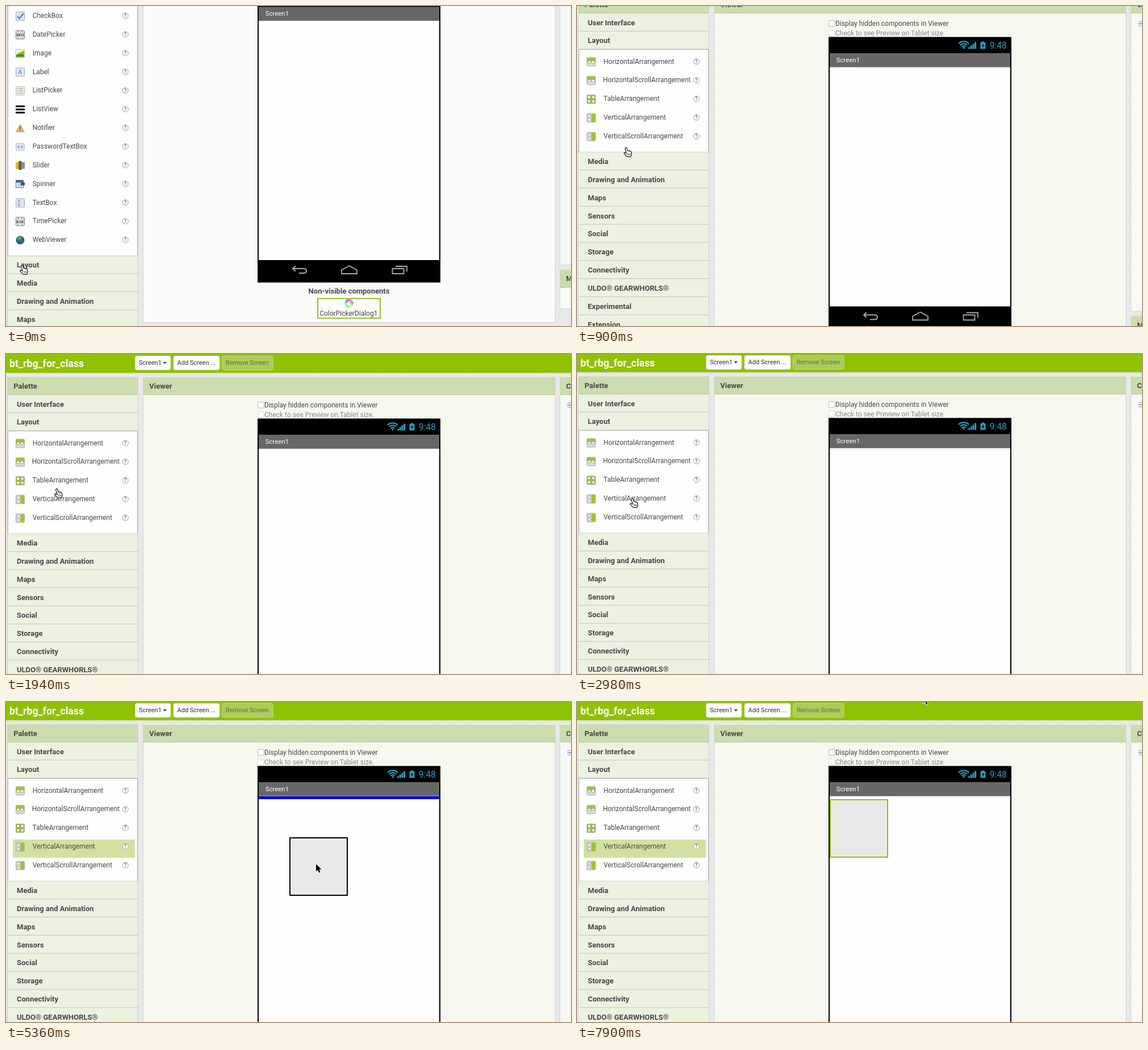
These frames come from a looping animation (995 by 563 pixels, 8000 ms). An HTML page:

```html
<!DOCTYPE html>
<html lang="en">
<head>
<meta charset="utf-8">
<title>Block designer</title>
<style>
html, body { margin: 0; width: 100%; height: 100%; overflow: hidden; background: #e8e8e8; }
svg { display: block; }
text { font: 12px Roboto, sans-serif; fill: #484848; white-space: pre; }
.b { font-weight: 700; font-size: 13px; }
.btn { font-size: 11px; }
.off { fill: #8b8b8b; }
.anim { animation: 8s step-end infinite; }
#page { animation-name: scroll; }
#viewer { animation-name: tint; }
#hand { animation-name: hand; }
#arrow { animation-name: arrow; }
#ghost { animation-name: ghost; }
#first { animation-name: first; }
#second { animation-name: second; }
#mark { animation-name: drag; }
#slot { animation-name: slot; }
#placed { animation-name: placed; }

@keyframes scroll {
  0% { transform: translateY(-139.5px); }
  7.5% { transform: translateY(-125px); }
  9.375% { transform: translateY(-91px); }
  11.25% { transform: translateY(-58px); }
  13% { transform: translateY(-37px); }
  14.875% { transform: translateY(-21px); }
  18.625% { transform: translateY(-10px); }
  20.5% { transform: translateY(-3px); }
  24.25% { transform: translateY(1px); }
  28%, 100% { transform: translateY(0); }
}
@keyframes tint { 0% { fill: #fafaf8; } 1.875%, 100% { fill: #f6f8f0; } }
@keyframes first { 0% { visibility: visible; } 1.875%, 100% { visibility: hidden; } }
@keyframes second { 0% { visibility: hidden; } 1.875%, 100% { visibility: visible; } }
@keyframes drag { 0% { visibility: hidden; } 52.25%, 100% { visibility: visible; } }
@keyframes slot {
  0% { visibility: hidden; } 63.375% { visibility: visible; } 74.5%, 100% { visibility: hidden; }
}
@keyframes placed { 0% { visibility: hidden; } 74.5%, 100% { visibility: visible; } }
@keyframes hand {
  0% { transform: translate(24px, 455px); }
  3.75% { transform: translate(29px, 440px); }
  5.625% { transform: translate(44px, 390px); }
  7.5% { transform: translate(65px, 318px); }
  9.375% { transform: translate(79px, 264px); }
  11.25% { transform: translate(82px, 248px); }
  24.25% { transform: translate(85px, 236px); }
  26.125% { transform: translate(88px, 250px); }
  28% { transform: translate(93px, 264px); }
  31.75% { transform: translate(93px, 262px); }
  33.625% { transform: translate(93px, 258px); }
  35.5% { transform: translate(93px, 255px); }
  37.25% { transform: translate(93px, 253px); visibility: visible; }
  52.25%, 100% { transform: translate(93px, 253px); visibility: hidden; }
}
@keyframes ghost {
  0% { transform: translate(52px, 209px); visibility: hidden; }
  52.25% { transform: translate(52px, 209px); visibility: visible; }
  54.125% { transform: translate(75px, 206px); }
  56% { transform: translate(125px, 203px); }
  57.875% { transform: translate(195px, 203px); }
  59.625% { transform: translate(275px, 208px); }
  61.5% { transform: translate(350px, 217px); }
  63.375% { transform: translate(425px, 228px); }
  65.125% { transform: translate(480px, 235px); }
  67% { transform: translate(499px, 238px); visibility: visible; }
  74.5%, 100% { transform: translate(499px, 238px); visibility: hidden; }
}
@keyframes arrow {
  0% { transform: translate(99px, 256px); visibility: hidden; }
  52.25% { transform: translate(99px, 256px); visibility: visible; }
  54.125% { transform: translate(122px, 253px); }
  56% { transform: translate(172px, 250px); }
  57.875% { transform: translate(242px, 250px); }
  59.625% { transform: translate(322px, 255px); }
  61.5% { transform: translate(397px, 264px); }
  63.375% { transform: translate(472px, 275px); }
  65.125% { transform: translate(527px, 282px); }
  67% { transform: translate(546px, 285px); }
  85.75% { transform: translate(548px, 277px); }
  87.625% { transform: translate(555px, 248px); }
  89.5% { transform: translate(567px, 198px); }
  91.375% { transform: translate(581px, 138px); }
  93.125% { transform: translate(593px, 82px); }
  95% { transform: translate(602px, 36px); }
  96.875% { transform: translate(608px, 5px); }
  98.75%, 100% { transform: translate(610px, -11px); visibility: visible; }
}
</style>
</head>
<body>
<svg id="stage" width="995" height="563" viewBox="0 0 995 563"></svg>
<script>
const rect = (x, y, w, h, fill, more = '') =>
  `<rect x="${x}" y="${y}" width="${w}" height="${h}" fill="${fill}" ${more}/>`;
const path = (d, fill, more = '') => `<path d="${d}" fill="${fill}" ${more}/>`;
const line = (d, color, w = 1) => path(d, 'none', `stroke="${color}" stroke-width="${w}"`);
const text = (x, y, s, cls = '', more = '') => `<text x="${x}" y="${y}" class="${cls}" ${more}>${s}</text>`;
const at = (x, y, s) => `<g transform="translate(${x} ${y})">${s}</g>`;
const tiny = (x, y, s, size, color) => text(x, y, s, '', `style="font-size:${size}px;fill:${color};font-weight:700"`);

// 16 x 16 component icons
const frame = (fill = '#e9edf3', edge = '#a3aab3') => rect(.5, .5, 15, 15, fill, `rx="1.5" stroke="${edge}"`);
const cells = (...spots) => spots.map(([x, y]) => rect(x, y, 4.5, 4.5, '#fff', 'rx=".8" stroke="#8d9a80" stroke-width=".8"')).join('');
const tile = frame('#d9dbd8', '#a9aca6');
const across = tile + rect(1, 1, 14, 7, '#9cc52f') + cells([2.5, 6], [9, 6]);
const down = tile + rect(8.5, 1, 6.5, 14, '#9cc52f') + cells([2.5, 2.5], [2.5, 9]);
const clock = s => frame('#eee', '#777') + rect(1, 4, 14, 7.5, '#cfcfcf') + tiny(1.5, 10.5, s, 6, '#333') +
  line('M3 2.5H6M10 2.5H13M3 13.5H6M10 13.5H13', '#666');
const icons = {
  Button: frame(),
  CheckBox: frame('#dce6f5') + line('M3 8.5L6.5 12L14 3', '#5b86cf', 2.6),
  DatePicker: clock('2011'),
  Image: rect(0, 1, 16, 14, '#eef2e4', 'rx="1" stroke="#b9c4a8"') + path('M1 10L8 6L15 3V14H1Z', '#8dbb2c') + path('M1 14V11Q8 7 15 11V14Z', '#4f8a1c'),
  Label: frame('#dfe7f4') + tiny(4.3, 12, 'A', 10.5, '#7e9bc8'),
  ListPicker: frame('#eeefe6', '#b7b8ae') + line('M5.5 4H13M5.5 8H13M5.5 12H13', '#aaa', 1.3) + line('M2.5 4H4M2.5 8H4M2.5 12H4', '#9cc52f', 1.5),
  ListView: line('M0 2.5H16M0 8H16M0 13.5H16', '#000', 3),
  Notifier: path('M8 1.5L15.5 14.5H.5Z', '#e9b765', 'stroke="#c99a55" stroke-linejoin="round"') + line('M8 5.5V10M8 11.5V13', '#754c1c', 1.6),
  PasswordTextBox: rect(.5, 2, 15, 12, '#dbe4ee', 'rx="1.5" stroke="#b3bdc8"') + '<circle cx="5" cy="8" r="1.6" fill="#7289a6"/><circle cx="11" cy="8" r="1.6" fill="#7289a6"/>',
  Slider: rect(0, 2, 6, 12, '#e5b91d') + rect(6, 1, 4, 14, '#666', 'stroke="#333"') + rect(11, 2, 5, 12, '#8d8d8d'),
  Spinner: rect(.5, 1, 13, 13, '#f4f4f4', 'stroke="#5c6d83"') + rect(1, 1.5, 12, 4, '#446fae') + line('M3 8H11M3 11H11', '#888') + rect(9, 5, 7, 5, '#3a5275'),
  TextBox: frame('#dde5ed') + line('M4 4H8M6 4V12M4 12H8', '#8b98a8', 1.2),
  TimePicker: clock('8:10'),
  WebViewer: '<circle cx="8" cy="8" r="7.5" fill="#2c5c97"/>' + path('M3 4Q8 0 11 3L9 7L4 9Z', '#68a83f') + path('M9 9L14 8Q13 13 9 14Z', '#3f8038'),
  HorizontalArrangement: across,
  HorizontalScrollArrangement: across,
  TableArrangement: frame('#9cc52f', '#a9aca6') + cells([2, 2], [9.5, 2], [2, 9.5], [9.5, 9.5]),
  VerticalArrangement: down,
  VerticalScrollArrangement: down
};
const names = Object.keys(icons);
const lists = [names.slice(0, 14), names.slice(14)];
const sections = ['User Interface', 'Layout', 'Media', 'Drawing and Animation', 'Maps', 'Sensors', 'Social',
  'Storage', 'Connectivity', 'ULDO® GEARWHORLS®', 'Experimental', 'Extension'];
const ROW = 31.85, ITEM = 32.85;

function item(name, y) {
  const x = name.startsWith('HorizontalScroll') ? 45.7 : 46.7;
  return at(17, y - 7, icons[name]) + text(x, y + 4.2, name) +
    `<circle cx="210.3" cy="${y + .3}" r="5" fill="#fff" stroke="#999"/>` + tiny(207.9, y + 3.4, '?', 8.5, '#777');
}

function palette(open) {
  let y = 87, out = '';
  sections.forEach((name, i) => {
    out += rect(3, y - 16, 229, ROW, '#edf1e0') + rect(3, y + 14.6, 229, 1.6, '#c8ccc6') + text(19, y + 4.6, name, 'b');
    if (i === open) {
      const items = lists[i], h = items.length * ITEM + 16.4;
      out += rect(3.5, y + 15.7, 228, h, '#fefefe', 'stroke="#b4b4b4"');
      if (i === 1) out += rect(12, 242, 215, 32, '#d3e0a3', 'id="mark" class="anim"');
      items.forEach((n, k) => out += item(n, y + 36.5 + k * ITEM));
      y += h;
    }
    y += ROW;
  });
  return rect(2.5, 40, 230, y - 56, '#edf1e0', 'stroke="#cfcfcf"') + out;
}

const head = (x, w, y, s) => rect(x, y, w, 31, '#cbdcae') + rect(x, y + 30, w, 1, '#b5c69b') + text(x + 10.3, y + 19.7, s, 'b');
const button = (x, w, s) => rect(x + .5, 2.5, w, 24.5, '#fdfdfd', 'rx="3" stroke="#d5dfbb"') + text(x + 7, 18, s, 'btn', 'style="fill:#333"');
const check = (y, s, cls, edge) => rect(443.5, y - 5, 10.5, 10.5, '#fff', `rx="1" stroke="${edge}"`) + text(455, y + 4.3, s, cls);

function toolbar() {
  return rect(0, -200, 995, 232, '#8fc202') + rect(0, 32, 995, 1.5, '#d3dcc0') +
    text(6, 22.3, 'bt_rbg_for_class', 'b', 'style="font-size:17.8px;fill:#fff"') +
    button(227, 62.5, 'Screen1') + path('M276.5 13H283L279.7 16.6Z', '#333') + button(294.5, 81, 'Add Screen ...') +
    rect(380.5, 2.5, 89.5, 24.5, '#abcb5d', 'rx="3" stroke="#c3da87"') + text(387, 18, 'Remove Screen', 'btn', 'style="fill:#5b7a23"');
}

function phone() {
  const blue = '#2d9cc3';
  const arc = (r, w) => line(`M${681 - r * .72} ${133 - r * .7}A${r} ${r} 0 0 1 ${681 + r * .72} ${133 - r * .7}`, blue, w);
  let out = rect(443, 112.5, 322, 513.5, '#000') + rect(445, 141, 318, 24.5, '#676767') + rect(445, 165.5, 318, 421, '#fefefe');
  out += arc(12.5, 2.4) + arc(8.6, 2.3) + arc(4.8, 2.2) + path('M681 134L678.8 131Q681 129.4 683.2 131Z', blue);
  [3, 6, 9, 12].forEach((h, i) => out += rect(689 + i * 3.7, 133.5 - h, 3, h, blue));
  out += path('M713 120.5H717V122H719.5V133.5H710.5V122H713Z', blue) + path('M715.8 123.5L712.5 128.2H714.8L714 132L717.6 127H715.3Z', '#000');
  out += text(726.7, 132.8, '9:48', '', `style="font-size:15.7px;fill:${blue}"`);
  out += text(456.8, 156.5, 'Screen1', '', 'style="font-size:11.4px;fill:#fff"');
  const gray = '#a9a9a9';
  out += line('M510 597L505 601.5L510 606M505.5 601.5H524Q529 601.5 529 605.5T524 609.5H516', gray, 2);
  out += line('M591 604L604.5 596.5L618 604V610.5H591Z', gray, 1.8);
  out += line('M680.5 601.5H700.5V610.5H680.5ZM686 597.5H706V606.5', gray, 1.8);
  return out;
}

function wheel() {
  const p = a => `${(604 + 7.4 * Math.cos(a)).toFixed(2)} ${(662.8 + 7.4 * Math.sin(a)).toFixed(2)}`;
  let out = '';
  for (let i = 0; i < 18; i++) {
    const a = i * Math.PI / 9;
    out += path(`M604 662.8L${p(a)}A7.4 7.4 0 0 1 ${p(a + .37)}Z`, `hsl(${i * 20 + 20} 90% 62%)`);
  }
  return out + '<circle cx="604" cy="662.8" r="7.4" fill="url(#glow)"/>';
}

function viewer() {
  return rect(241.5, 40.5, 725.5, 655.5, '#f6f8f0', 'id="viewer" class="anim" stroke="#d2d2d2"') + head(242, 725, 40, 'Viewer') +
    check(88.5, 'Display hidden components in Viewer', '', '#b3b3b3') +
    check(105.3, 'Check to see Preview on Tablet size.', 'off', '#d6d6d6') + phone() +
    text(604, 645, 'Non-visible components', 'b', 'text-anchor="middle"') +
    rect(549, 654.3, 110, 34.5, 'none', 'stroke="#8fc31f" stroke-width="2"') + wheel() +
    text(603.3, 684.5, 'ColorPickerDialog1', '', 'text-anchor="middle"');
}

function side() {
  return rect(975.5, 40.5, 60, 554.5, '#f8f9f4', 'stroke="#d2d2d2"') + head(976, 60, 40, 'Components') +
    rect(989.5, 85, 8, 8, '#f4f4fb', 'rx="1.5" stroke="#9a9ac8"') + line('M991 89H996', '#55559b', 1.3) +
    rect(975.5, 603.5, 60, 68.5, '#f9faf6', 'stroke="#d2d2d2"') + head(976, 60, 604, 'Media');
}

const defs = `<defs>
  <pattern id="grain" width="5" height="4" patternUnits="userSpaceOnUse">
    ${rect(0, 0, 5, 4, '#e9e9e9') + rect(1, 0, 1, 1, '#dfdfdf') + rect(3, 2, 1, 1, '#e0e0e0') + rect(4, 1, 1, 1, '#f0f0f0')}
  </pattern>
  <radialGradient id="glow"><stop offset="0" stop-color="#fff"/><stop offset="1" stop-color="#fff" stop-opacity="0"/></radialGradient>
</defs>`;

const hand = path('M3.2 1.7Q4.8.3 5.8 2.2L7.3 6.6Q8.8 5.8 9.6 7.1Q11.1 6.5 11.8 7.9Q13.3 7.6 13.6 9.2L13.9 13L12.8 17.2H6.2L1 11.6Q.5 9.8 2.2 9.7L5.2 11.2L2.8 3.6Q2.6 2.4 3.2 1.7Z',
  '#fff', 'stroke="#111" stroke-width="1.2" stroke-linejoin="round"') + line('M7.4 11.5V14.5M9.4 11.5V14.5M11.4 11.5V14.5', '#222', .9);
const arrow = path('M0 0V13.2L3 10.4L5.2 15.6L7.6 14.6L5.4 9.6H9.6Z', '#000', 'stroke="#fff" stroke-width="2" paint-order="stroke" stroke-linejoin="round"');

document.getElementById('stage').innerHTML = defs +
  `<g id="page" class="anim">${rect(0, -200, 995, 1200, 'url(#grain)')}
    <g id="first" class="anim">${palette(0)}</g>
    <g id="second" class="anim">${palette(1)}</g>
    ${head(3, 229, 40, 'Palette')}${viewer()}${side()}${toolbar()}
  </g>
  ${rect(445, 166, 318, 5, '#0000f5', 'id="slot" class="anim"')}
  ${rect(446, 172, 101, 101, '#e8e8e8', 'id="placed" class="anim" stroke="#8fc202" stroke-width="2"')}
  <g id="ghost" class="anim">${rect(1, 1, 101, 101, '#e8e8e8', 'stroke="#000" stroke-width="2"')}</g>
  <g id="hand" class="anim">${hand}</g>
  <g id="arrow" class="anim">${arrow}</g>`;
</script>
</body>
</html>
```
